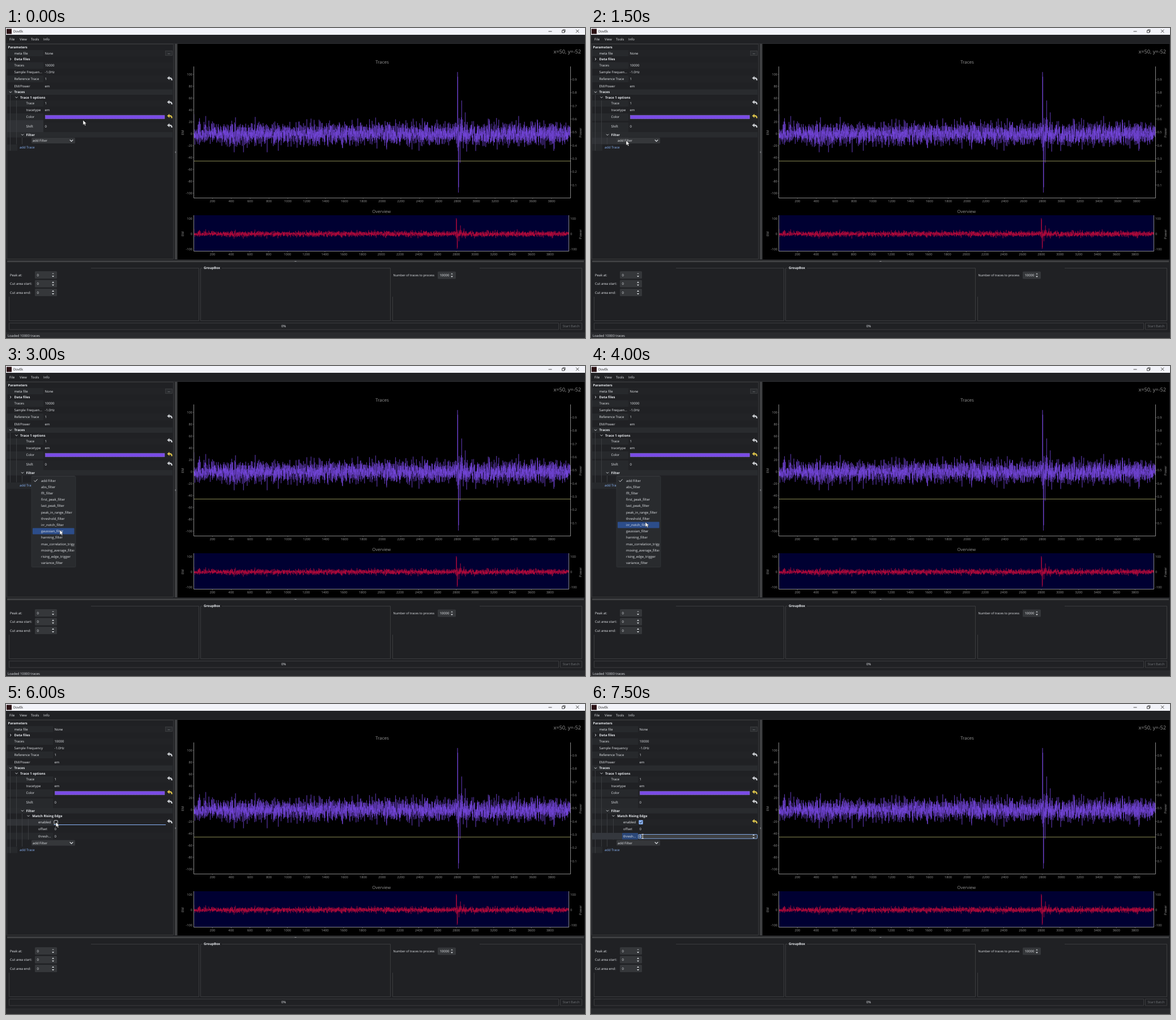
An HTML page that plays this animation: 1022x548 px, repeating every 8000 ms.

```html
<!DOCTYPE html>
<html lang="en">
<head>
<meta charset="utf-8">
<title>Trace viewer</title>
<style>
html, body { margin: 0; width: 100%; height: 100%; overflow: hidden; background: #202124; }
svg { display: block; width: 100vw; height: 100vh; }
text { font-family: "Open Sans", "Noto Sans", sans-serif; text-rendering: geometricPrecision; white-space: pre; }
</style>
</head>
<body>
<svg id="stage" viewBox="0 0 1022 548" xmlns="http://www.w3.org/2000/svg"></svg>
<script>
const INK = '#e4e7eb', EDGE = '#3f4042', AXIS = '#969696', BLUE = '#8ab4f7', PURPLE = '#7a4be6';

const rect = (x, y, w, h, fill, more = '') =>
  `<rect x="${x}" y="${y}" width="${w}" height="${h}" fill="${fill}" ${more}/>`;
const path = (d, stroke, width = 1, more = '') =>
  `<path d="${d}" fill="none" stroke="${stroke}" stroke-width="${width}" ${more}/>`;
const group = (id, body) => `<g id="${id}">${body}</g>`;

// y is the vertical middle of the line of text
function text(x, y, str, { size = 5.9, fill = INK, bold = false, anchor = 'start', more = '' } = {}) {
  return `<text x="${x}" y="${(y + size * 0.36).toFixed(2)}" font-size="${size}" fill="${fill}"` +
    ` text-anchor="${anchor}" ${bold ? 'font-weight="700"' : ''} ${more}>${str}</text>`;
}
const bold = (x, y, str) => text(x, y, str, { bold: true });
const chevron = (x, y, r = 2, width = 0.9) =>
  path(`M${x - r} ${y - r / 2}l${r} ${r}l${r} ${-r}`, INK, width);
const undo = (y, color = '#c9ccd0') =>
  path(`M287 ${y - 1}h2.5q3.4 .2 3 4`, color, 2.4) +
  `<path d="M284.3 ${y - 1}l4.2 -3.6v7.2z" fill="${color}"/>`;
const arrows = (x, y, top = INK, low = INK) =>
  `<path d="M${x - 2} ${y - 1.6}l2 -2.2l2 2.2z" fill="${top}"/>` +
  `<path d="M${x - 2} ${y + 1.6}l2 2.2l2 -2.2z" fill="${low}"/>`;

function windowFrame() {
  return rect(0, 0, 1022, 548, '#202124') +
    rect(0, 0, 1022, 12, '#f2f3f9') + rect(1, 1.5, 9, 9, '#2a1013') +
    text(13, 6.2, 'DovEk', { fill: '#1a1a1a' }) +
    path('M957.5 6h6', '#222', 0.8) +
    path('M981.5 4.2h4v4h-4zM983 4.2v-1.3h4v4h-1.5', '#222', 0.8) +
    path('M1006 2.8l5.4 5.4M1011.4 2.8l-5.4 5.4', '#222', 0.8) +
    [['File', 6], ['View', 24], ['Tools', 44], ['Info', 66]].map(([s, x]) => text(x, 19.8, s)).join('') +
    path('M0 27.5H1022', '#2c2d30') +
    path('M1.5 28.5H295.5V408.5H1.5z', EDGE, 0.8) +
    rect(298, 28, 4, 381, EDGE) + rect(298.5, 218, 1.2, 3, '#85878b') +
    rect(303, 28, 718, 381, '#000') +
    rect(2, 411, 1018, 3, EDGE) + rect(509.5, 412, 3, 1, '#85878b');
}

function spinBox(x, y, w, value, top) {
  return rect(x, y - 6.5, w, 13, '#35373a', 'rx="1.5"') +
    text(x + 3.5, y, value) + arrows(x + w - 7, y, top, '#dfe2e6');
}

function bottomPanel() {
  const fields = [['Peak at:', 436.5, '#85878b'], ['Cut area start:', 452, INK], ['Cut area end:', 467.5, INK]];
  return path('M150 424.5H340.5V517.5H5.5V475', EDGE, 0.9) +
    path('M381 424.5H678.5V517.5H343.5V424.5H347', EDGE, 0.9) +
    path('M836 424.5H1016.5V517.5H682.5V475', EDGE, 0.9) +
    bold(349, 423.5, 'GroupBox') +
    fields.map(([s, y, c]) => text(7, y, s) + spinBox(51, y, 39, 0, c)).join('') +
    text(683.5, 437, 'Number of traces to process', { size: 5.5 }) +
    spinBox(762, 437, 32, '10000', '#b0b3b7') +
    path('M5.5 521.5H975.5V533H5.5z', EDGE, 0.9) + text(490, 527.3, '0%', { anchor: 'middle' }) +
    path('M978.5 521.5H1016.5V533H978.5z', EDGE, 0.9) +
    text(997.5, 527.3, 'Start Batch', { anchor: 'middle', fill: '#6f7276' }) +
    rect(0, 538, 1022, 10, '#292a2d') +
    group('status', text(3, 544.3, 'Loaded 10000 traces'));
}

// Recorded signal: Gaussian noise with a burst near sample 2800
function makeSignal() {
  let seed = 7;
  const rnd = () => (seed = (seed * 16807) % 2147483647) / 2147483647;
  const gauss = () => Math.sqrt(-2 * Math.log(rnd())) * Math.cos(2 * Math.PI * rnd());
  const out = [];
  for (let i = 0; i < 4000; i++) {
    const burst = i > 2800 ? 0.6 * Math.exp((2800 - i) / 90) : 0;
    const v = 9 * gauss() * (1 + burst);
    out.push(Math.max(-31, Math.min(33, v)));
  }
  const peaks = [[2798, 104], [2801, 96], [2807, -99], [2810, -90],
    [2826, -49], [2842, 56], [2880, 36], [2895, -30]];
  for (const [i, v] of peaks) out[i] = v;
  return out;
}

const plotLine = (data, x0, dx, y0, dy) =>
  'M' + data.map((v, i) => (x0 + i * dx).toFixed(1) + ' ' + (y0 - v * dy).toFixed(1)).join('L');

function plots() {
  const data = makeSignal();
  const label = (x, y, s, anchor) => text(x, y, s, { fill: AXIS, size: 5.7, anchor });
  const side = (x, y, s) => text(0, 0, s, {
    fill: AXIS, size: 5.9, anchor: 'middle', more: `transform="translate(${x} ${y}) rotate(-90)"` });
  const title = (x, y, s, size) => text(x, y, s, { fill: AXIS, size, anchor: 'middle' });
  let s = text(1015, 41.3, 'x=50, y=-52', { fill: AXIS, size: 9.2, anchor: 'end' }) +
    title(664, 60, 'Traces', 7.9) + title(662.8, 323.8, 'Overview', 7.5);

  s += path(plotLine(data, 331.8, 0.16625, 187, 1.05), PURPLE, 0.5, 'stroke-linejoin="bevel"');
  s += path('M332 235.2H997', '#8f8f58');
  s += path('M331.5 68V300.5H996.5V68', AXIS, 0.9);
  for (let v = -100; v <= 100; v += 20) {
    const y = 187 - v * 1.05;
    s += label(329, y, v, 'end') + path(`M330 ${y}h2`, AXIS, 0.6);
  }
  for (let i = 1; i < 10; i++) {
    const y = 300.8 - i * 23.3;
    s += label(999.5, y, (i / 10).toFixed(1)) + path(`M996.5 ${y}h2`, AXIS, 0.6);
  }

  s += rect(332, 331, 662, 64, '#000032');
  s += path(plotLine(data, 331.8, 0.1655, 364, 0.268), '#c50d3c', 0.5, 'stroke-linejoin="bevel"');
  s += path('M331.5 331V394.5H993.5V331', AXIS, 0.9);
  for (const v of [100, 0, -100]) {
    const y = 364 - v * 0.266;
    s += label(329, y, v, 'end') + label(996, y, v);
  }
  for (let v = 200; v < 4000; v += 200) {
    const x = 331.2 + v * 0.16625, x2 = 331.2 + v * 0.16556;
    s += label(x, 305.6, v, 'middle') + label(x2, 399.5, v, 'middle') +
      path(`M${x} 300v1.8M${x2} 395v1.6`, AXIS, 0.6);
  }
  return s + side(312, 185, 'EM') + side(1013.5, 185, 'Power') +
    side(312, 364, 'EM') + side(1013.5, 364.5, 'Power');
}

const combo = y => rect(45, y - 5, 77, 10, '#35373a', 'rx="1.5"') + text(47, y, 'add Filter') + chevron(115.5, y, 2.8, 1.2);

// Parameter tree; the extra filter rows widen the label column
function tree(withFilter) {
  const col = withFilter ? 83 : 66, val = col + 2.5, down = withFilter ? 46.5 : 0;
  const stripe = (y, h) => rect(2, y, col - 2, h, '#27292c') + rect(col, y, 293 - col, h, '#222326');
  const row = (x, y, name, value) => text(x, y, name) + text(val, y, value);
  const guide = '#3d3f43';
  let s = [[39, 11], [60.5, 11.5], [84, 12], [128, 11], [151, 13], [167, 17]].map(a => stripe(...a)).join('') +
    rect(2, 108.5, 292, 9.5, '#292b2e') + rect(2, 184, 292, 9.5, '#292b2e');
  if (withFilter) s += stripe(203.5, 11.5) + stripe(227.5, 12);
  s += rect(2, 206 + down, 18, 11, '#27292c') +
    rect(2, 0, col - 2, 12, '#303236', 'class="hover"') +
    path(`M7.5 118V${217 + down}M18.5 128V${205.5 + down}M28.5 194V${205.5 + down}` +
      (withFilter ? 'M39.5 203V240' : ''), guide, 0.9);
  s += bold(3.5, 34, 'Parameters') + row(14.5, 44.6, 'meta file', 'None') +
    rect(281.5, 40.5, 12, 8, '#2a2c2f', `stroke="${EDGE}" stroke-width=".8"`) +
    text(287.5, 44, '...', { anchor: 'middle' }) +
    path('M7 53l2 2l-2 2', INK, 0.9) + bold(14.5, 55, 'Data files') +
    row(14.5, 66, 'Traces', '10000') +
    row(14.5, 78, withFilter ? 'Sample Frequency' : 'Sample Frequen...', '-1.0Hz') +
    row(14.5, 90.3, 'Reference Trace', 1) + undo(89.5) +
    row(14.5, 102.5, 'EM/Power', 'em') +
    chevron(8, 113.3) + bold(14.5, 113.3, 'Traces') +
    chevron(18.5, 122.6) + bold(25, 122.6, 'Trace 1 options') +
    row(35.5, 133, 'Trace', 1) + undo(132) +
    row(35.5, 145, 'tracetype', 'em') +
    text(35.5, 157.2, 'Color') +
    rect(col + 3.3, 154.3, 276.7 - col, 6.2, PURPLE, 'stroke="#a795ea" stroke-width=".6" stroke-dasharray="1.5 1"') +
    undo(156.3, '#d8c04a') +
    row(35.5, 174, 'Shift', 0) + undo(173) +
    chevron(29, 188.7) + bold(35.5, 188.7, 'Filter');
  if (withFilter) {
    s += chevron(39.5, 197.8) + bold(46.3, 197.8, 'Match Rising Edge') +
      group('focus', path('M84 213.5H282', BLUE, 1.2)) + text(57, 209, 'enabled') +
      group('unchecked', rect(84.8, 205.8, 6.4, 6.4, '#202124', `rx="1" stroke="${INK}" stroke-width=".9"`) + undo(208)) +
      group('checked', rect(84.3, 205.3, 7.4, 7.4, BLUE, 'rx="1"') +
        path('M86 209l1.5 1.6l2.8 -3.2', '#202124') + undo(208, '#d8c04a')) +
      row(57, 221.3, 'offset', 0) +
      group('edit', rect(2, 228, 81, 11.5, '#34373d') + rect(55, 228, 28, 11.5, '#2b4778') +
        rect(83.5, 230.5, 210, 7.5, '#3f4042', `rx="1.2" stroke="${BLUE}" stroke-width=".9"`) +
        rect(85, 231.3, 4, 6, '#4a6fae') + arrows(287, 234.2)) +
      row(57, 233.5, 'thresh...', 0);
  }
  return s + combo(199 + down) + text(24, 211.2 + down, 'add Trace', { fill: BLUE });
}

const ITEMS = ['add Filter', ...['abs', 'fft', 'first_peak', 'last_peak', 'peak_in_range', 'threshold',
  'irr_notch', 'gaussian', 'hanning'].map(n => n + '_filter'),
  'max_correlation_trigger', 'moving_average_filter', 'rising_edge_trigger', 'variance_filter'];
const itemY = i => 202.6 + i * 11.19;

function popup() {
  return rect(2, 206, 43, 11, '#27292c') + text(24, 211.2, 'add Trac', { fill: BLUE }) +
    rect(45, 195, 78, 160.5, '#292b2e', 'rx="1.5" stroke="#36383b" stroke-width=".7"') +
    rect(47, 0, 73.5, 11, '#2c4d8a', 'id="pick" rx="1"') +
    path('M49.5 202.5l2 2l4 -4.2', INK, 0.9) +
    '<clipPath id="menuClip"><path d="M45 195H120.5V356H45z"/></clipPath><g clip-path="url(#menuClip)">' +
    ITEMS.map((n, i) => text(62, itemY(i), n)).join('') + '</g>';
}

const stage = document.getElementById('stage');
stage.innerHTML = windowFrame() + group('plain', tree(false)) + group('extended', tree(true)) +
  group('menu', popup()) + bottomPanel() + plots() +
  group('arrow', '<path d="M0 0V8.4L2 6.6L3.4 9.6L4.9 8.9L3.5 6H6.1z" fill="#fff" stroke="#222" stroke-width=".5"/>') +
  group('beam', path('M89.5 230.2h3.4M91.2 230.2v7.4M89.5 237.6h3.4', '#fff', 0.8));

const $ = id => document.getElementById(id);
const show = (id, on) => $(id).setAttribute('visibility', on ? 'visible' : 'hidden');
const hovers = document.querySelectorAll('.hover');

const STEP = 500, LOOP = 8000;
// Pointer tip at each step
const POINTER = [[136, 163], [112, 178], [74, 194], [62, 199], [64, 202], [84, 248], [95, 290], [96, 287],
  [96, 276], [98, 314], [99, 337], [97, 300], [88, 209], [88, 209], [89, 226], [91, 234]];

// Top and bottom of the rows that light up under the pointer
const PLAIN_ROWS = [[163, 184], [193.5, 205.5]];
const FILTER_ROWS = [[203.5, 215], [215, 227.5]];

function drawHover(y, rows) {
  const row = rows.find(([top, end]) => y >= top && y < end);
  for (const bar of hovers) {
    bar.setAttribute('y', row ? row[0] : 0);
    bar.setAttribute('height', row ? row[1] - row[0] : 0);
  }
}

function draw(t) {
  const step = Math.floor(t / STEP);
  const [x, y] = POINTER[step];
  const added = t >= 5500, ticked = t >= 6500, editing = t >= 7500;
  const menuOpen = t >= 2000 && !added;
  show('plain', !added);
  show('extended', added);
  show('menu', menuOpen);
  show('status', t < 4500);
  show('focus', t >= 6000 && t < 7000);
  show('unchecked', added && !ticked);
  show('checked', ticked);
  show('edit', editing);
  show('arrow', !editing);
  show('beam', editing);
  drawHover(y, menuOpen ? [] : added ? FILTER_ROWS : PLAIN_ROWS);
  const item = Math.max(0, Math.min(ITEMS.length - 1, Math.round((y - itemY(0)) / 11.19)));
  $('pick').setAttribute('y', itemY(item) - 5.5);
  $('arrow').setAttribute('transform', `translate(${x} ${y})`);
}

const start = performance.now();
function tick() {
  draw((performance.now() - start) % LOOP);
  requestAnimationFrame(tick);
}
tick();
</script>
</body>
</html>
```
